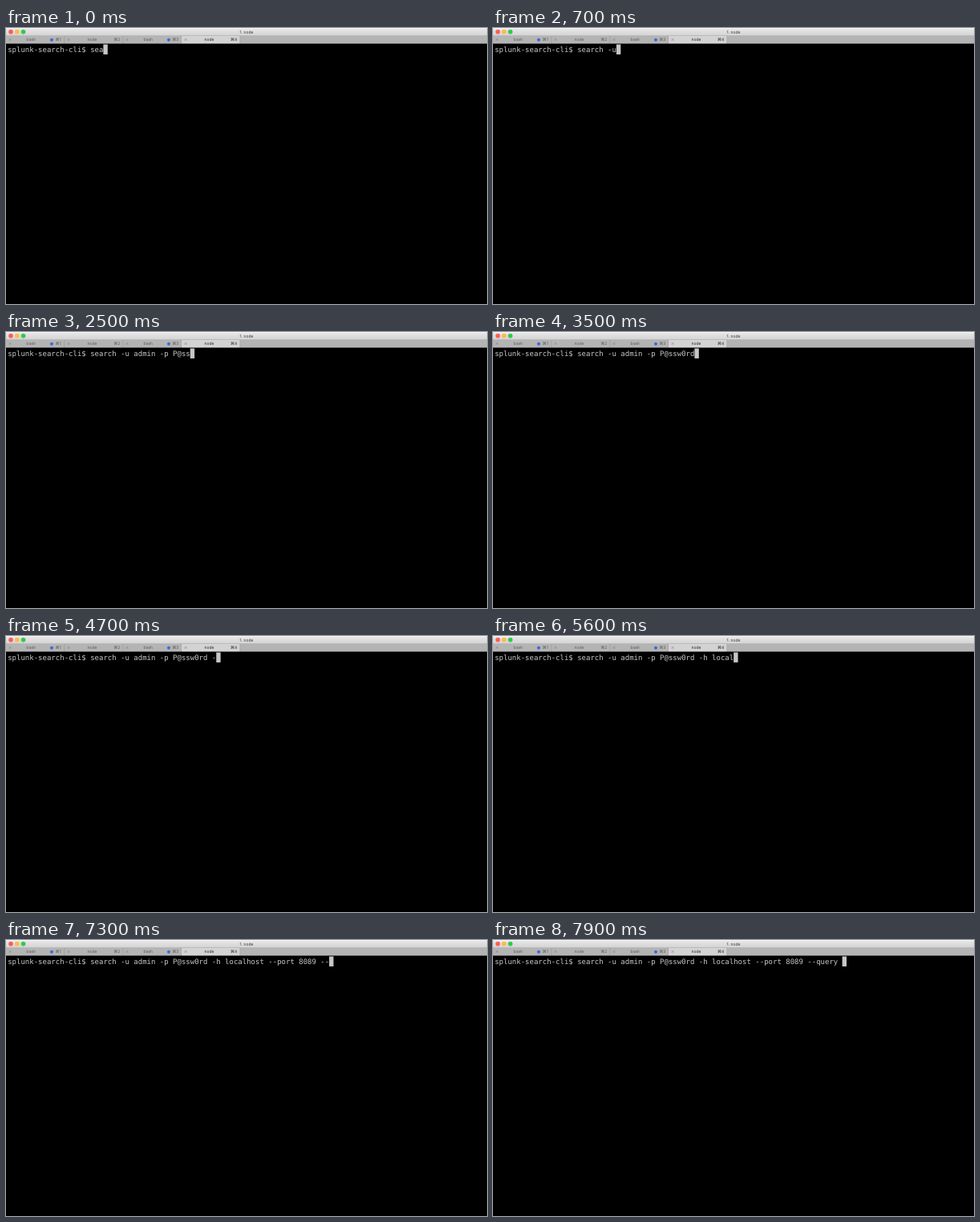
Write an HTML page that moves like this. It is 600 px wide and 344 px high and loops after 8000 ms.

```html
<!DOCTYPE html>
<html>
<head>
<meta charset="utf-8">
<style>
  html, body { margin: 0; width: 100%; height: 100%; overflow: hidden; background: #000; }
  svg { display: block; text-rendering: geometricPrecision; }
  .ui { font: 5px Inter, "DejaVu Sans", sans-serif; text-anchor: middle; }
  .shell { font: 9px "DejaVu Sans Mono", monospace; white-space: pre; fill: #c7c7c7; }
</style>
</head>
<body>
<svg width="600" height="344" viewBox="0 0 600 344">
  <defs>
    <linearGradient id="bar" x2="0" y2="1">
      <stop stop-color="#e9e9e9"/><stop offset="1" stop-color="#d2d2d2"/>
    </linearGradient>
  </defs>
  <rect width="600" height="10" fill="url(#bar)"/>
  <rect width="600" height="1" fill="#f6f6f6"/>
  <g id="lights"></g>
  <text class="ui" x="300" y="7" fill="#333">1. node</text>
  <rect y="10" width="600" height="10" fill="#b4b4b4"/>
  <g id="tabs" class="ui"></g>
  <rect y="9.5" width="600" height=".5" fill="#a2a2a2"/>
  <rect y="19.5" width="600" height="325"/>
  <text id="line" class="shell" x="2.2" y="30.1" xml:space="preserve"></text>
  <rect id="cursor" y="20.5" width="5.4" height="12.4" fill="#c7c7c7"/>
</svg>
<script>
const CELL = 9 * 0.602, STEP = 100, LOOP = 8000;
const $ = id => document.getElementById(id);

$('lights').innerHTML = ['#fc5b57', '#fdbc40', '#34c84a'].map((color, i) =>
  `<circle cx="${6 + 7.8 * i}" cy="4.8" r="2.8" fill="${color}"/>`).join('');

$('tabs').innerHTML = ['bash', 'node', 'bash', 'node'].map((name, i) => {
  const active = i === 3, busy = name === 'bash', ink = active ? '#222' : '#5a5a5a';
  return `<g transform="translate(${i * 73} 0)" fill="${ink}">
    ${active ? '<rect y="10" width="73" height="10" fill="#d3d3d3"/>' : ''}
    <rect x="72.6" y="10" width=".6" height="10" fill="#999"/>
    <path d="M3.6 13l3 3m0-3l-3 3" stroke="#777" stroke-width=".5"/>
    <text x="${busy ? 31.3 : 34.5}" y="16.4">${name}</text>
    ${busy ? '<circle cx="57" cy="14.8" r="2.1" fill="#4468e0"/>' : ''}
    <text x="65.2" y="16.4">⌘${i + 1}</text>
  </g>`;
}).join('');

// Each burst is typed evenly: time of first key, time of last key, keys
const bursts = [
  [100, 300, 'rch '],
  [600, 1500, '-u admin -p '],
  [1800, 2800, 'P@ssw0'],
  [3300, 3900, 'rd -'],
  [4400, 4500, '-h'],
  [4600, 4700, '\b\b'],
  [4900, 5000, 'h '],
  [5400, 5600, 'local'],
  [5700, 6000, 'host -'],
  [6200, 6500, '-port '],
  [6700, 6900, '8089'],
  [7100, 7500, ' --qu'],
  [7700, 7900, 'ery ']
];

function screen(t) {
  let text = 'splunk-search-cli$ sea';
  for (const [start, end, keys] of bursts) {
    if (t < start) break;
    const count = 1 + Math.floor((keys.length - 1) * (t - start) / (end - start));
    for (const key of keys.slice(0, count)) {
      text = key === '\b' ? text.slice(0, -1) : text + key;
    }
  }
  return text;
}

function draw(now) {
  const t = now % LOOP;
  const text = screen(t - t % STEP);
  $('line').textContent = text;
  $('cursor').setAttribute('x', 2.2 + text.length * CELL);
  requestAnimationFrame(draw);
}
draw(0);
</script>
</body>
</html>
```
